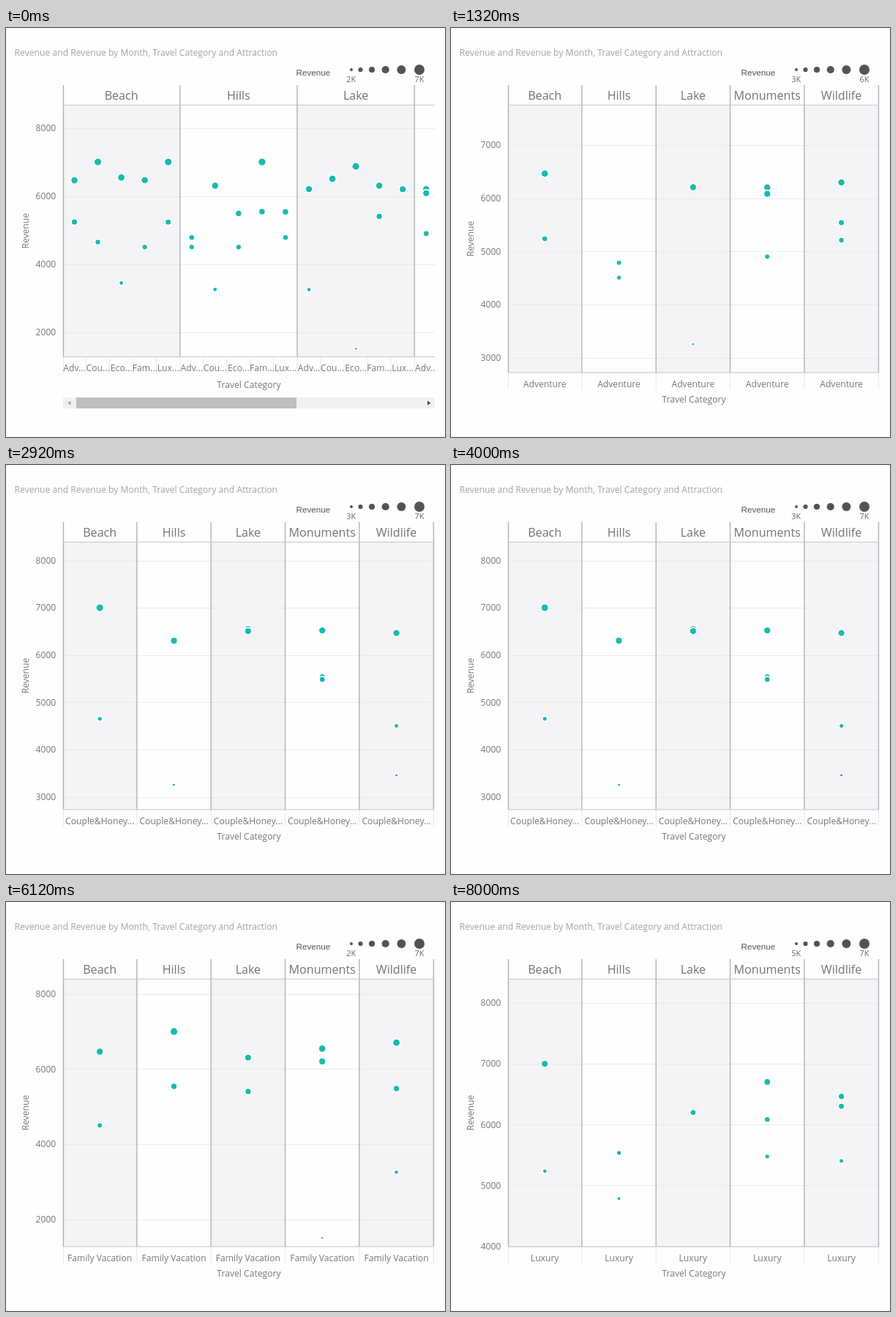
Animation, 600 px wide and 559 px high, one loop 8.96 s. Source, as an HTML page:

```html
<!DOCTYPE html>
<html lang="en">
<head>
<meta charset="utf-8">
<title>Revenue by travel category</title>
<style>
  html, body { margin: 0; width: 100%; height: 100%; overflow: hidden; background: #fefefe; }
  #stage { position: relative; width: 600px; height: 559px; overflow: hidden; }
  #strip { display: flex; width: 3600px; animation: views 8960ms step-end infinite; }
  svg { flex: none; display: block; width: 600px; height: 559px; overflow: hidden; }
  text { font: 12.15px "Open Sans", "Noto Sans", sans-serif; fill: #777; text-anchor: middle; }
  .title { fill: #a3a2a3; text-anchor: start; }
  .tick { text-anchor: end; }
  .header { font-size: 16.1px; fill: #737173; }
  .legend { font: 11.7px "Liberation Sans", Arial, sans-serif; fill: #555; text-anchor: start; }
  .range { font-size: 10.8px; fill: #666; }
  .band { fill: #f4f3f5; }
  .grid { stroke: #e9e8eb; }
  .split { stroke: #e8e8ea; }
  .rule { stroke: #c6c4c7; }
  .column { stroke: #b3b1b5; stroke-width: 1.4; }
  .dot { fill: #18bbae; stroke: #fff; stroke-width: 3.6; paint-order: stroke; }
  .size { fill: #555255; }
  .track { fill: #f0f0f0; }
  .thumb { fill: #c0bfc0; }
  @keyframes views {
    0% { transform: translateX(0); }
    14.732% { transform: translateX(-600px); }
    32.589% { transform: translateX(-1200px); }
    51.339% { transform: translateX(-1800px); }
    66.964% { transform: translateX(-2400px); }
    84.821%, 100% { transform: translateX(-3000px); }
  }
</style>
</head>
<body>
<div id="stage"><div id="strip"></div></div>
<script>
const LEFT = 77.5, RIGHT = 586, TOP = 105;
const attractions = ["Beach", "Hills", "Lake", "Monuments", "Wildlife"];

// Revenue per category, one list for each attraction
const adventure = [[6463, 5238], [4785, 4505], [6206, 3255], [6202, 6082, 4900], [6298, 5540, 5210]];
const couple = [[7000, 4652], [6303, 3257], [6550, 6504], [6520, 5540, 5484], [6465, 4502, 3455]];
const economic = [[6543, 3450], [5490, 4502], [6870, 1522], [6504, 4652, 3257], [7243, 6522, 3605]];
const family = [[6465, 4502], [7000, 5541], [6305, 5405], [6543, 6202, 1516], [6704, 5482, 3257]];
const luxury = [[7000, 5236], [5536, 4785], [6200], [6702, 6084, 5476], [6463, 6300, 5404]];

// axis: lowest tick, its y, highest tick, its y, tick step
const views = [
  { labels: ["Adv...", "Cou...", "Eco...", "Fam...", "Lux..."], data: [adventure, couple, economic, family, luxury],
    axis: [2000, 416, 8000, 136.5, 2000], radius: [1.3, 4.8], range: ["2K", "7K"], column: 160.25, bottom: 449.5, scroll: true },
  { labels: ["Adventure"], data: [adventure],
    axis: [3000, 450.5, 7000, 160, 1000], radius: [1.5, 4.4], range: ["3K", "6K"] },
  { labels: ["Couple&amp;Honey..."], data: [couple],
    axis: [3000, 453.5, 8000, 130.5, 1000], radius: [1.5, 4.6], range: ["3K", "7K"] },
  { labels: ["Economic"], data: [economic],
    axis: [2000, 435.5, 8000, 139, 2000], radius: [1.2, 4.7], range: ["2K", "7K"] },
  { labels: ["Family Vacation"], data: [family],
    axis: [2000, 434, 8000, 125.5, 2000], radius: [1.2, 4.6], range: ["2K", "7K"] },
  { labels: ["Luxury"], data: [luxury],
    axis: [4000, 470.5, 8000, 138, 1000], radius: [1.9, 4.2], range: ["5K", "7K"] }
];

const text = (x, y, label, cls = "", extra = "") => `<text class="${cls}" x="${x}" y="${y}" ${extra}>${label}</text>`;
const line = (x1, y1, x2, y2, cls) => `<line class="${cls}" x1="${x1}" y1="${y1}" x2="${x2}" y2="${y2}"/>`;
const rect = (x, y, w, h, cls) => `<rect class="${cls}" x="${x}" y="${y}" width="${w}" height="${h}"/>`;
const circle = (x, y, r, cls) => `<circle class="${cls}" cx="${x}" cy="${y}" r="${r}"/>`;
const snap = x => Math.max(78.5, x);

function legend([low, high]) {
  const sizes = [[472, 2], [484.5, 3.1], [500, 4.1], [518.7, 5.1], [540.4, 6], [565, 7]];
  return text(396.5, 65, "Revenue", "legend") +
    sizes.map(([x, r]) => circle(x, 57, r, "size")).join("") +
    text(471.7, 74, low, "range") + text(565, 74, high, "range");
}

function scrollbar() {
  return rect(78, 505, 508, 15, "track") + rect(96, 505, 301, 15, "thumb") +
    `<path d="M88.5 509.5v6l-4.5-3z" fill="#a3a3a3"/><path d="M576 509.5v6l4.5-3z" fill="#484848"/>`;
}

function draw({ labels, data, axis, radius, range, column = 101.35, bottom = 471, scroll }, index) {
  const [low, lowY, high, highY, step] = axis;
  const values = data.flat(2), min = Math.min(...values), max = Math.max(...values);
  const yOf = v => lowY + (v - low) / (high - low) * (highY - lowY);
  const rOf = v => radius[0] + (v - min) / (max - min) * (radius[1] - radius[0]);
  const cell = column / labels.length;
  const labelY = bottom + (scroll ? 19.5 : 19.6);
  const end = scroll ? RIGHT : 585;
  let bands = "", grid = "", rules = "", dots = "", names = "", ticks = "";

  for (let v = low; v <= high; v += step) {
    const y = yOf(v);
    ticks += text(68.3, y + 4.3, v, "tick");
    grid += line(78, Math.round(y) + .5, end, Math.round(y) + .5, "grid");
  }
  attractions.forEach((name, i) => {
    const x = LEFT + i * column;
    if (i % 2 === 0) bands += rect(x, TOP, column, bottom - TOP, "band");
    rules += line(snap(x), 78, snap(x), bottom, "column");
    names += text(x + column / 2, 98.4, name, "header");
    labels.forEach((label, j) => {
      const left = x + j * cell, center = left + cell / 2;
      rules += line(snap(left), bottom, snap(left), bottom + 23, "split");
      names += text(center, labelY, label);
      data[j][i].forEach(v => dots += circle(center, yOf(v), rOf(v), "dot"));
    });
  });
  if (!scroll) rules += line(584.4, 78, 584.4, bottom, "column") + line(584.4, bottom, 584.4, bottom + 23, "split");
  rules += line(78, TOP + .3, end, TOP + .3, "rule") + line(78, bottom, end, bottom, "rule");

  const middle = (TOP + bottom) / 2;
  return `<svg viewBox="0 0 600 559">
    <clipPath id="plot${index}"><rect width="${RIGHT}" height="559"/></clipPath>
    ${text(11.6, 37.6, "Revenue and Revenue by Month, Travel Category and Attraction", "title")}
    ${legend(range)}
    <g clip-path="url(#plot${index})">${bands}${grid}${rules}${dots}${names}</g>
    ${ticks}
    ${text(0, 0, "Revenue", "", `transform="translate(31 ${middle}) rotate(-90)"`)}
    ${text(332, bottom + (scroll ? 42 : 41.2), "Travel Category")}
    ${scroll ? scrollbar() : ""}
  </svg>`;
}

document.getElementById("strip").innerHTML = views.map(draw).join("");
</script>
</body>
</html>
```
